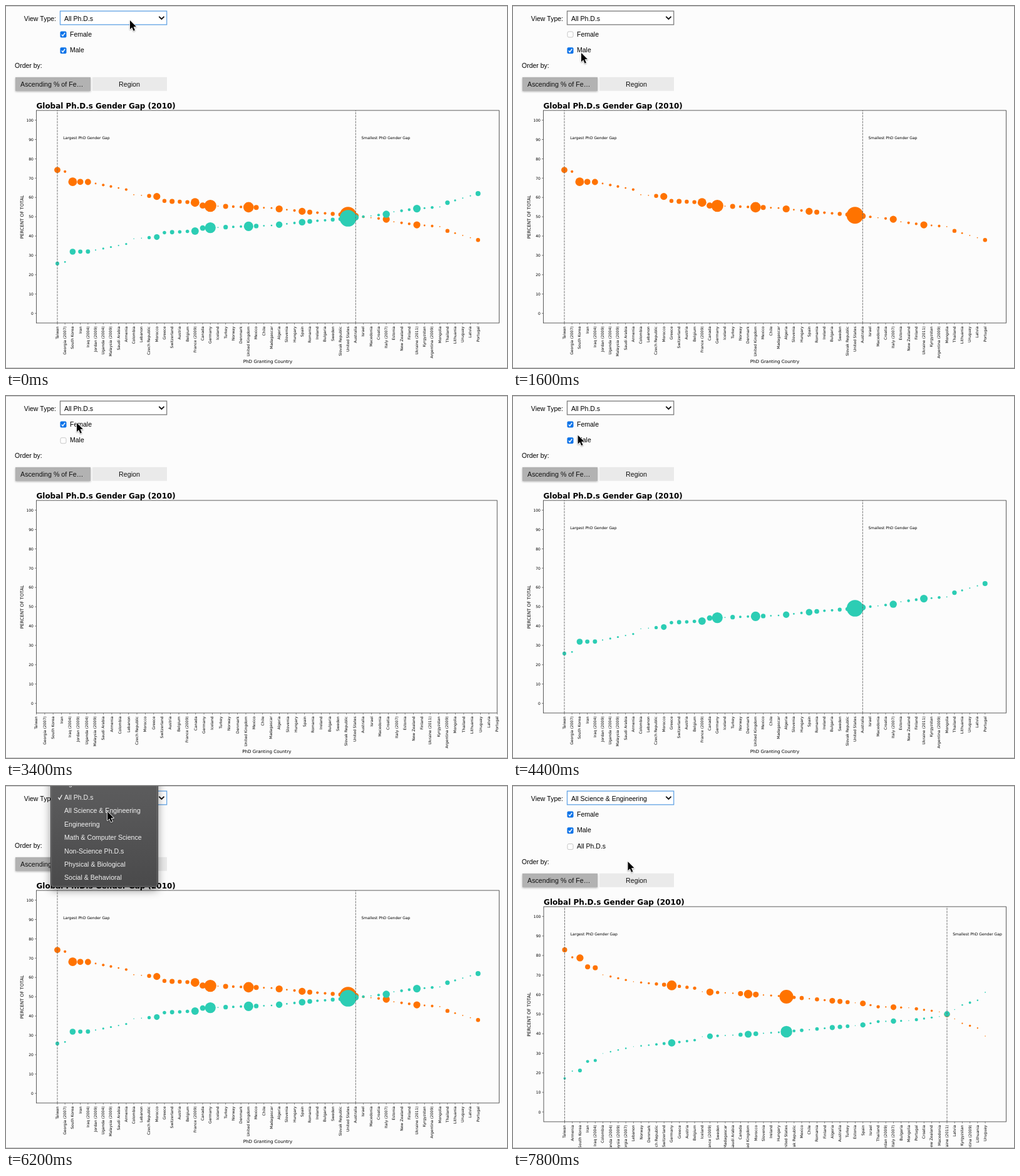
An HTML page with a canvas for the animation above (8 s loop, 800 by 579 pixels).

```html
<!DOCTYPE html>
<html lang="en">
<head>
<meta charset="utf-8">
<title>Ph.D. gender gap</title>
<style>
  html, body { margin: 0; width: 100%; height: 100%; overflow: hidden; background: #fcfcfc; }
  canvas { display: block; }
</style>
</head>
<body>
<canvas id="stage" width="800" height="579"></canvas>
<script>
const ctx = document.getElementById('stage').getContext('2d');
const LOOP = 8000, STEP = 200;
const UI = '"Liberation Sans", Arial, sans-serif';
const PLOT = '"DejaVu Sans", sans-serif';
const ORANGE = '#ff7300', TEAL = '#2ccdb4';

// Dot radius by class of country; all others use the default
const DEFAULT_RADIUS = 2.1;
const sizes = [
  [13.5, 'United States'],
  [9.6, 'Germany'],
  [8.3, 'United Kingdom'],
  [6.9, 'South Korea,France'],
  [5.6, 'Spain,Italy,Algeria,Morocco,Ukraine'],
  [4.9, 'Taiwan,Iran,Iraq,Canada,Australia'],
  [4, 'Switzerland,Turkey,Mexico,Romania'],
  [3.2, 'Czech Republic,Austria,Belgium,Sweden,Thailand,Portugal,Slovak Republic,Greece'],
  [1.4, 'Jordan,Saudi Arabia,Chile,Madagascar,Slovenia,Kyrgyzstan,Lithuania'],
  [.9, 'Colombia,Lebanon,Iceland,Macedonia,Estonia,Mongolia,Uruguay,Latvia']
];
const radiusOf = {};
for (const [r, names] of sizes) names.split(',').forEach(name => radiusOf[name] = r);

// The curve holds key points: plot position, male share in percent
const allPhds = {
  names: 'Taiwan,Georgia (2007),South Korea,Iran,Iraq (2004),Jordan (2009),Uganda (2004),Malaysia (2009),Saudi Arabia,Armenia,Colombia,Lebanon,Czech Republic,Morocco,Greece,Switzerland,Austria,Belgium,France (2009),Canada,Germany,Iceland,Turkey,Norway,Denmark,United Kingdom,Mexico,Chile,Madagascar,Algeria,Slovenia,Hungary,Spain,Romania,Ireland,Bulgaria,Sweden,Slovak Republic,United States,Australia,Israel,Macedonia,Croatia,Italy (2007),Estonia,New Zealand,Finland,Ukraine (2011),Kyrgyzstan,Argentina (2009),Mongolia,Thailand,Lithuania,Uruguay,Latvia,Portugal'.split(','),
  curve: [[0, 74.2], [1, 73.4], [2, 68.1], [4, 68], [9, 64.1], [10, 61.4], [13, 60.5],
    [14, 58.2], [18, 57.4], [19, 55.8], [28, 54.5], [33, 52.4], [37, 51.2], [43, 48.7],
    [44, 47.4], [47, 45.8], [50, 44.9], [51, 42.7], [55, 38]],
  dotScale: 1,
  even: 39
};
const science = {
  names: 'Taiwan,Armenia,South Korea,Iran,Iraq (2004),Colombia,Uganda (2004),Malaysia (2009),Georgia (2007),Lebanon,Norway,Denmark,Czech Republic,Switzerland,Germany,Greece,Austria,Belgium,Iceland,France (2009),Sweden,Madagascar,Saudi Arabia,Canada,United Kingdom,Morocco,Slovenia,Ireland,Hungary,United States,Slovak Republic,Mexico,Chile,Romania,Finland,Algeria,Australia,Turkey,Estonia,Spain,Israel,Thailand,Jordan (2009),Italy (2007),Bulgaria,Mongolia,Portugal,Croatia,New Zealand,Macedonia,Ukraine (2011),Latvia,Kyrgyzstan,Argentina (2009),Lithuania,Uruguay'.split(','),
  curve: [[0, 82.9], [1, 79.1], [2, 78.8], [3, 74.2], [4, 73.7], [5, 70.1], [9, 66.6],
    [14, 64.7], [17, 63.3], [18, 61.5], [23, 60.5], [28, 59.3], [36, 56.5], [39, 55.5],
    [41, 53.8], [45, 53.3], [49, 51.2], [50, 49.9], [52, 45.3], [54, 42.9], [55, 38.8]],
  dotScale: .82,
  even: 50
};

const full = { left: 48.5, right: 787.5, top: 167, bottom: 507, x0: 82, dx: 12.214, zero: 491.6, unit: 3.09, scale: 1 };
const bare = { ...full, right: 784.2, x0: 48.5, dx: 13.38 };
const tall = { ...full, left: 49, bottom: 511, x0: 82.5, dx: 12.21, zero: 495.3, unit: 3.127, scale: 1.012 };

// Pointer path: time, x, y
const path = [
  [0, 198, 23], [200, 198, 23], [800, 92, 45], [1600, 109, 75], [2000, 93, 71],
  [2600, 93, 71], [3000, 92, 43], [3400, 113, 43], [4200, 92, 70], [5400, 162, 26],
  [5800, 162, 25], [6200, 162, 41], [6600, 148.5, 58], [7200, 149, 61], [7800, 183.5, 121]
];

// Linear interpolation through [position, ...values] key points
function along(keys, at) {
  const i = keys.findIndex(key => key[0] > at);
  if (i < 0) return keys[keys.length - 1].slice(1);
  const [a, ...from] = keys[i - 1], [b, ...to] = keys[i];
  return from.map((v, n) => v + (to[n] - v) * (at - a) / (b - a));
}

function text(str, x, y, font, align = 'left', color = '#000') {
  ctx.font = font;
  ctx.textAlign = align;
  ctx.fillStyle = color;
  ctx.fillText(str, x, y);
}

function upright(str, x, y, font, align) {
  ctx.save();
  ctx.translate(x, y);
  ctx.rotate(-Math.PI / 2);
  text(str, 0, 0, font, align);
  ctx.restore();
}

function line(points, color, width, dash = []) {
  ctx.beginPath();
  points.forEach(([x, y]) => ctx.lineTo(x, y));
  ctx.strokeStyle = color;
  ctx.lineWidth = width;
  ctx.setLineDash(dash);
  ctx.stroke();
  ctx.setLineDash([]);
}

function roundRect(x, y, w, h, r, fill, stroke, width = 1) {
  ctx.beginPath();
  ctx.roundRect(x, y, w, h, r);
  if (fill) { ctx.fillStyle = fill; ctx.fill(); }
  if (stroke) { ctx.strokeStyle = stroke; ctx.lineWidth = width; ctx.stroke(); }
}

// Dot area follows the number of graduates, plus a thin outline
function dots(data, g, color, female) {
  const edge = .3;
  ctx.fillStyle = color;
  data.names.forEach((name, i) => {
    const [male] = along(data.curve, i);
    const pct = female ? 100 - male : male;
    const r = (radiusOf[name.split(' (')[0]] || DEFAULT_RADIUS) * data.dotScale;
    ctx.beginPath();
    ctx.arc(g.x0 + i * g.dx, g.zero - pct * g.unit, (r - edge) * Math.sqrt(pct / male) + edge, 0, 7);
    ctx.fill();
  });
}

function marker(g, index, label) {
  const x = g.x0 + index * g.dx;
  line([[x, g.bottom], [x, g.top]], '#666', .9, [3.33, 1.44]);
  text(label, x + 9.2, g.zero - 90.2 * g.unit, `${6 * g.scale}px ${PLOT}`);
}

function chart(data, g, men, women) {
  const small = `${6 * g.scale}px ${PLOT}`;
  const medium = `${7.15 * g.scale}px ${PLOT}`;
  if (men) dots(data, g, ORANGE, false);
  if (women) dots(data, g, TEAL, true);
  if (men || women) {
    marker(g, 0, 'Largest PhD Gender Gap');
    marker(g, data.even, 'Smallest PhD Gender Gap');
  }
  ctx.strokeStyle = '#333';
  ctx.lineWidth = .8;
  ctx.strokeRect(g.left, g.top, g.right - g.left, g.bottom - g.top);
  for (let v = 0; v <= 100; v += 10) {
    const y = g.zero - v * g.unit;
    line([[g.left - 2.5, y], [g.left, y]], '#333', .6);
    text(v, g.left - 4.6, y + 2.2, small, 'right');
  }
  data.names.forEach((name, i) => {
    const x = g.x0 + i * g.dx;
    line([[x, g.bottom], [x, g.bottom + 2.5]], '#333', .6);
    upright(name, x + 1.9, g.bottom + 5.4, small, 'right');
  });
  upright('PERCENT OF TOTAL', 28.3, (g.top + g.bottom) / 2 + .5, medium, 'center');
  text('PhD Granting Country', (g.left + g.right) / 2, g.bottom + 64, medium, 'center');
  text('Global Ph.D.s Gender Gap (2010)', g.left, g.top - 3.1, `bold ${11.95 * g.scale}px ${PLOT}`);
}

function label(str, x, y, align) {
  text(str, x, y, `10.5px ${UI}`, align);
}

function checkbox(name, y, on) {
  if (on) {
    roundRect(86.5, y - 5, 10, 10, 2, '#0b73e8');
    line([[88.9, y + .3], [90.8, y + 2.4], [94.2, y - 2.6]], '#fff', 1.5);
  } else {
    roundRect(87, y - 4.5, 9, 9, 2, '#fff', '#c6c6c6');
  }
  label(name, 102, y + 3.1);
}

function selectBox(value, focused) {
  roundRect(86.5, 8.2, 170.2, 21.6, 0, '#fff', focused ? '#5b9fe3' : '#767676', 1.2);
  label('View Type:', 80, 23.8, 'right');
  label(value, 93, 23.8);
  line([[244.3, 16.8], [248.4, 21], [252.5, 16.8]], '#111', 1.9);
}

function buttons() {
  ctx.save();
  ctx.shadowColor = 'rgba(0,0,0,.3)';
  ctx.shadowBlur = 3;
  ctx.shadowOffsetY = 1;
  roundRect(15, 114, 120, 21.7, 0, '#b2b2b2');
  ctx.restore();
  roundRect(138, 113.7, 119, 22, 0, '#eaeaea');
  const font = `10.7px ${UI}`;
  text('Ascending % of Fe…', 23, 128.8, font, 'left', '#111');
  text('Region', 197, 128.8, font, 'center', '#111');
}

function menu() {
  const shade = ctx.createLinearGradient(0, 0, 0, 161);
  shade.addColorStop(0, '#5c5c5d');
  shade.addColorStop(1, '#4a4a4b');
  ctx.save();
  ctx.shadowColor = 'rgba(0,0,0,.45)';
  ctx.shadowBlur = 14;
  ctx.shadowOffsetY = 5;
  roundRect(71.5, -20, 171, 181.5, 5, shade);
  ctx.restore();
  roundRect(71.5, -20, 171, 181.5, 5, null, '#39393a');
  roundRect(72.5, -20, 169, 180.5, 4, null, 'rgba(255,255,255,.2)');
  ['Agriculture', 'All Ph.D.s', 'All Science & Engineering', 'Engineering', 'Math & Computer Science',
    'Non-Science Ph.D.s', 'Physical & Biological', 'Social & Behavioral']
    .forEach((item, i) => text(item, 93, .3 + i * 21.45, `10.6px ${UI}`, 'left', '#f2f2f2'));
  line([[83.4, 18.4], [85.5, 21.4], [89.4, 14.3]], '#f2f2f2', 1.3);
}

function pointer(x, y) {
  ctx.save();
  ctx.translate(x, y);
  ctx.scale(.92, .92);
  ctx.beginPath();
  [[0, 0], [0, 15.4], [3.5, 12.1], [6.1, 18.1], [8.6, 17], [6, 11.2], [10.8, 11]]
    .forEach(p => ctx.lineTo(...p));
  ctx.closePath();
  ctx.shadowColor = 'rgba(0,0,0,.35)';
  ctx.shadowBlur = 2;
  ctx.shadowOffsetY = 1;
  ctx.strokeStyle = '#fff';
  ctx.lineWidth = 1.8;
  ctx.lineJoin = 'round';
  ctx.stroke();
  ctx.shadowColor = 'transparent';
  ctx.fillStyle = '#000';
  ctx.fill();
  ctx.restore();
}

function draw(t) {
  const within = (a, b) => t >= a && t < b;
  const switched = t >= 6400;
  const men = !within(2400, 5000);
  const women = !within(1000, 3600);

  ctx.fillStyle = '#fcfcfc';
  ctx.fillRect(0, 0, 800, 579);
  line([[0, .5], [800, .5]], '#c8c8c8', 1);

  selectBox(switched ? 'All Science & Engineering' : 'All Ph.D.s', t < 600 || t >= 5800);
  checkbox('Female', 45.5, !within(800, 3000));
  checkbox('Male', 71.3, !within(2000, 4200));
  if (switched) checkbox('All Ph.D.s', 97.1, false);

  ctx.save();
  if (switched) ctx.translate(0, 26);
  label('Order by:', 14, 98.5);
  buttons();
  if (t >= 7000) chart(science, tall, true, true);
  else chart(allPhds, men || women ? full : bare, men, women);
  ctx.restore();

  line([[0, 578.5], [800, 578.5]], '#c8c8c8', 1);
  if (within(5800, 6400)) menu();
  pointer(...along(path, t));
}

let shown = -1;
const start = performance.now();
function tick() {
  const t = (performance.now() - start) % LOOP;
  const step = Math.floor(t / STEP) * STEP;
  if (step !== shown) draw(shown = step);
  requestAnimationFrame(tick);
}
tick();
</script>
</body>
</html>
```
